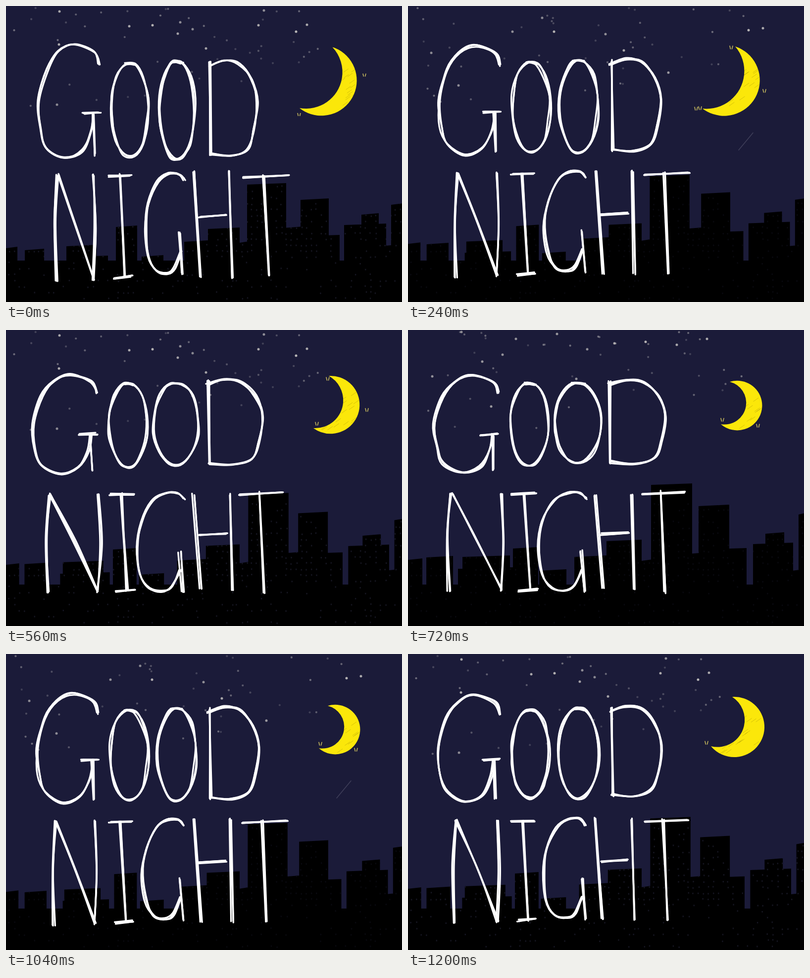
Write an HTML page with a canvas that moves like this. It is 800 by 600 pixels and loops after 1.36 s.

```html
<!DOCTYPE html>
<html lang="en">
<head>
<meta charset="utf-8">
<title>Good night</title>
<style>
html, body { margin: 0; width: 100%; height: 100%; overflow: hidden; background: #1b1b39 }
canvas { display: block }
</style>
</head>
<body>
<canvas id="stage" width="800" height="600"></canvas>
<script>
const ctx = document.getElementById('stage').getContext('2d');

// Pen strokes in percent of the letter's box.
const glyphs = {
  G: ['98 18 90 7 58 0 33 6 14 22 1 50 4 74 14 91 42 100 70 94 85 77 89 61', '72 61 98 60', '89 62 91 97'],
  D: ['2 2 4 98', '0 6 30 0 62 3 88 20 100 43 94 72 80 92 45 99 2 97'],
  N: ['2 100 0 45 5 0', '7 0 50 48 92 99', '92 0 96 50 91 99'],
  I: ['0 1 90 0', '45 0 68 100', '24 101 98 99'],
  g: ['99 6 85 0 60 0 32 8 8 30 0 55 8 83 27 97 55 100 74 95 91 78', '89 60 96 101'],
  H: ['1 1 19 99', '93 1 100 100', '14 43 84 41'],
  T: ['0 2 100 0', '45 0 55 100']
};

// Letter boxes (left, top, right, bottom) at both ends of the wobble.
const letters = [
  ['G', [66, 77, 191, 308], [52, 92, 185, 289]],
  ['O', [212, 115, 287, 305], [207, 107, 284, 276]],
  ['O', [310, 110, 381, 311], [296, 106, 389, 270]],
  ['D', [411, 110, 506, 306], [406, 100, 520, 272]],
  ['N', [100, 343, 183, 558], [80, 332, 197, 528]],
  ['I', [209, 342, 256, 549], [210, 331, 262, 527]],
  ['g', [281, 339, 360, 541], [264, 329, 362, 528]],
  ['H', [380, 333, 457, 551], [378, 332, 458, 524]],
  ['T', [480, 343, 570, 545], [471, 328, 558, 532]]
];

// Buildings (left, top, right) at both ends of the wobble.
const buildings = [
  [[0, 489, 23], [0, 464, 29]],
  [[38, 493, 77], [37, 459, 91]],
  [[122, 485, 183], [110, 458, 206]],
  [[122, 507, 206], [101, 482, 212]],
  [[222, 446, 265], [212, 441, 263]],
  [[274, 506, 318], [265, 486, 320]],
  [[360, 476, 408], [336, 458, 401]],
  [[408, 450, 472], [401, 426, 472]],
  [[472, 478, 490], [472, 466, 493]],
  [[487, 360, 566], [491, 312, 574]],
  [[560, 448, 600], [565, 452, 600]],
  [[595, 391, 652], [587, 355, 649]],
  [[590, 465, 674], [590, 443, 684]],
  [[683, 442, 768], [697, 432, 778]],
  [[718, 421, 753], [722, 411, 760]],
  [[766, 484, 800], [776, 486, 800]],
  [[778, 401, 802], [789, 372, 802]]
];

const brightStars = [
  '103 200 586 52 377 47 608 38 521 9 347 56 352 33 108 11 404 86 510 39 296 39 249 41 107 78',
  '47 95 102 161 211 52 271 24 399 57 526 135 717 45 688 49 295 52 436 90',
  '108 4 49 94 168 155 150 64 191 50 218 18 301 8 362 39 340 99 417 27 480 24 543 30 604 18'
];

// Upper tip, lower tip, a point of the outer arc, a point of the inner arc; then twinkles.
const moons = [
  ['659 83 593 207 700 185 672 167', '724 140 592 220'],
  ['661 82 595 208 703 183 668 172', '653 84 720 172 582 208 590 207'],
  ['655 87 612 187 706 187 668 168', '603 180'],
  ['652 93 621 199 707 180 673 172', '650 99 628 190 729 162'],
  ['650 105 632 191 714 165 682 158', '635 182 707 194'],
  ['646 116 646 185 712 150 679 148', '697 105 667 150']
];

const letterWobble = [0, .3, .45, .9, 1];
const cityWobble = [0, .35, .6, .6, 1];
const poseSky = [0, 1, 2, 0, 2, 0, 1, 0];
const poseMoon = [0, 1, 2, 3, 4, 5, 4, 2];

function randomFrom(seed) {
  return () => {
    seed = (seed * 16807) % 2147483647;
    return seed / 2147483647;
  };
}

const mix = (a, b, k) => a.map((v, i) => v + (b[i] - v) * k);

function points(text) {
  const n = text.split(' ').map(Number);
  return n.filter((_, i) => i % 2 === 0).map((x, i) => [x, n[2 * i + 1]]);
}

// Smooth curve through all points.
function curve(p) {
  ctx.moveTo(...p[0]);
  for (let i = 0; i < p.length - 1; i++) {
    const a = p[i - 1] || p[i], b = p[i], c = p[i + 1], d = p[i + 2] || c;
    ctx.bezierCurveTo(b[0] + (c[0] - a[0]) / 6, b[1] + (c[1] - a[1]) / 6,
      c[0] - (d[0] - b[0]) / 6, c[1] - (d[1] - b[1]) / 6, ...c);
  }
}

// Circular arc from a over b to c.
function arcThrough([ax, ay], [bx, by], [cx, cy], reverse) {
  const p = bx - ax, q = by - ay, r = cx - ax, s = cy - ay;
  const m = p * p + q * q, n = r * r + s * s, det = 2 * (p * s - q * r);
  const dx = (s * m - q * n) / det, dy = (p * n - r * m) / det;
  const x = ax + dx, y = ay + dy;
  ctx.arc(x, y, Math.hypot(dx, dy), Math.atan2(ay - y, ax - x), Math.atan2(cy - y, cx - x), reverse);
}

const ring = Array.from({ length: 14 }, (_, i) => {
  const a = i * Math.PI / 6 - 1.8;
  return [50 + 50 * Math.cos(a), 50 + 50 * Math.sin(a)];
});

function drawSky(index) {
  const rnd = randomFrom(9100 + index * 77);
  const star = (x, y, radius, alpha) => {
    ctx.fillStyle = `rgba(225,222,215,${alpha})`;
    ctx.beginPath();
    ctx.arc(x, y, radius, 0, 7);
    ctx.fill();
  };
  points(brightStars[index]).forEach(([x, y]) => star(x, y, 2.5, .55 + rnd() * .25));
  for (let i = 0; i < 42; i++) {
    const x = 15 + rnd() * 670;
    star(x, 4 + rnd() ** 1.5 * (250 - x * .2), 2.1, .18 + rnd() * .25);
  }
  if (index === 1) {
    ctx.strokeStyle = 'rgba(150,145,165,.3)';
    ctx.lineWidth = 1.5;
    ctx.beginPath();
    ctx.moveTo(668, 292);
    ctx.lineTo(697, 257);
    ctx.stroke();
  }
}

function drawCity(wobble, lit) {
  const rnd = randomFrom(3700);
  ctx.save();
  ctx.beginPath();
  ctx.rect(0, 516, 800, 84);
  for (const [from, to] of buildings) {
    const [left, top, right] = mix(from, to, wobble);
    ctx.moveTo(left, 600);
    ctx.lineTo(left, top + 2);
    ctx.lineTo(right, top - 1);
    ctx.lineTo(right, 600);
  }
  ctx.fillStyle = '#000';
  ctx.fill();
  ctx.clip();
  ctx.fillStyle = lit ? '#151520' : '#09090f';
  for (let y = 350; y < 595; y += 12) {
    for (let x = 4; x < 800; x += 10) {
      if (rnd() < (y < 500 ? .5 : .2)) ctx.fillRect(x + rnd() * 3, y + rnd() * 3, 2.5, 3);
    }
  }
  ctx.restore();
}

function drawMoon(index) {
  const [shape, twinkles] = moons[index].map(points);
  const [upper, lower, outer, inner] = shape;
  const rnd = randomFrom(1100 + index);
  ctx.save();
  ctx.beginPath();
  arcThrough(upper, outer, lower, false);
  arcThrough(lower, inner, upper, true);
  ctx.fillStyle = '#fbe70a';
  ctx.fill();
  ctx.clip();
  ctx.strokeStyle = 'rgba(120,105,0,.3)';
  ctx.lineWidth = 1;
  ctx.beginPath();
  for (let i = 0; i < 24; i++) {
    const x = 630 + rnd() * 75, y = 130 + rnd() * 75;
    ctx.moveTo(x, y);
    ctx.lineTo(x + 10, y - 7);
  }
  ctx.stroke();
  ctx.restore();
  ctx.strokeStyle = 'rgba(225,210,100,.8)';
  ctx.lineWidth = 1.7;
  ctx.beginPath();
  for (const [x, y] of twinkles) {
    for (const side of [-3, 3]) {
      ctx.moveTo(x + side, y - 3);
      ctx.lineTo(x + side / 2, y + 3);
    }
  }
  ctx.stroke();
}

function drawLetters(index) {
  const rnd = randomFrom(5300 + index * 31);
  const shake = size => (rnd() - .5) * size;
  ctx.strokeStyle = '#fff';
  ctx.lineWidth = 3.4;
  ctx.lineCap = ctx.lineJoin = 'round';
  for (const [name, from, to] of letters) {
    const [left, top, right, bottom] = mix(from, to, letterWobble[index]);
    const strokes = name === 'O' ? [ring] : glyphs[name].map(points);
    for (const stroke of strokes) {
      for (let pass = 0; pass < 3; pass++) {
        const dx = shake(3), dy = shake(3);
        ctx.beginPath();
        curve(stroke.map(([x, y]) => [
          left + (right - left) * x / 100 + dx + shake(4.5),
          top + (bottom - top) * y / 100 + dy + shake(3.5)
        ]));
        ctx.stroke();
      }
    }
  }
}

let shown = -1;
function frame(now) {
  // The first pose is held for 240 ms, the others for 160 ms.
  const pose = Math.max(0, Math.floor((now % 1360 - 80) / 160));
  if (pose !== shown) {
    shown = pose;
    const drawing = pose % 5;
    ctx.fillStyle = '#1b1b39';
    ctx.fillRect(0, 0, 800, 600);
    drawSky(poseSky[pose]);
    drawCity(cityWobble[drawing], drawing % 5 === 0 || drawing === 2 || drawing === 3);
    drawMoon(poseMoon[pose]);
    drawLetters(drawing);
  }
  requestAnimationFrame(frame);
}
frame(0);
</script>
</body>
</html>
```
